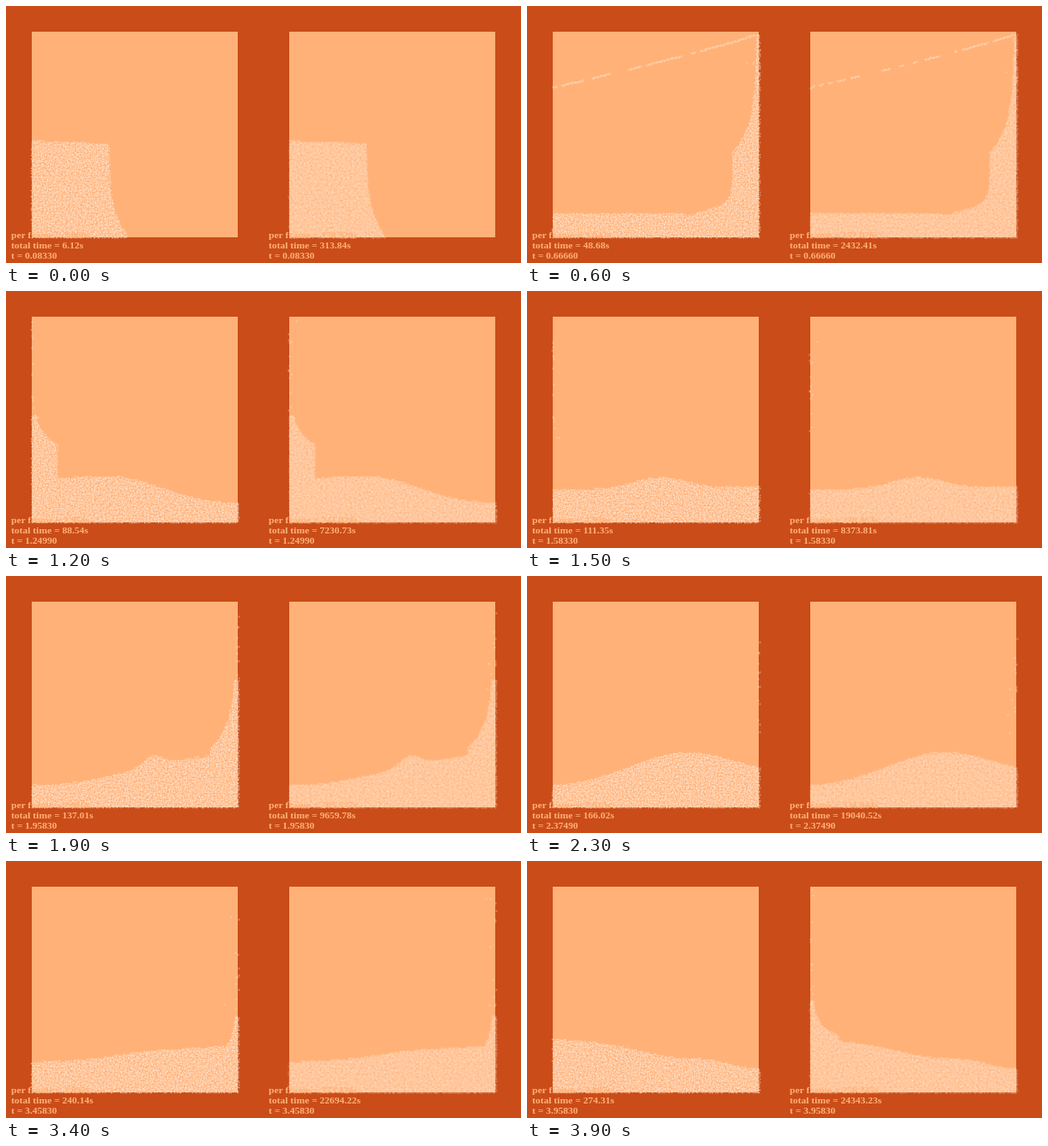
A matplotlib script for the animation above (4 s loop, 600 by 300 pixels).

```python
import math

import matplotlib.pyplot as plt
import numpy as np
from matplotlib.animation import FuncAnimation
from matplotlib.patches import Rectangle

W, H, DPI = 600, 300, 100
FRAMES, INTERVAL = 40, 100
FPS = 24  # simulated steps per second
BACK, BOX, FOAM = "#ca4c18", "#ffb178", "#fff3e6"
LO, SIZE = 30, 240  # tank corner and side
HI = LO + SIZE
PANELS = (0, 300)
CELL = 1.7  # particle spacing

# Sloshing pool: step, depth left, depth right, crest x, crest height, crest width
POOL = np.array([
    (4, 0, 0, 200, 0, 40),
    (16, 29, 27, 205, 0, 40),
    (22, 30, 46, 160, 24, 45),
    (30, 50, 23, 110, 14, 65),
    (47, 26, 62, 140, 12, 16),
    (57, 24, 36, 148, 32, 88),
    (71, 58, 30, 85, 14, 35),
    (83, 36, 54, 130, 2, 35),
    (95, 62, 27, 185, 7, 35),
])

# Water climbing a wall: wall, first step, last step, foot, thickness, decay, top, panels
RUNUPS = (
    ("right", 5, 22, 100, 28, 30, 237, (0, 1)),
    ("left", 25, 37, 92, 26, 14, 126, (0, 1)),
    ("right", 40, 56, 70, 29, 27, 150, (0, 1)),
    ("left", 65, 77, 60, 3, 10, 75, (0, 1)),
    ("right", 78, 90, 55, 10, 15, 90, (0, 1)),
    ("left", 90, 102, 67, 30, 11, 108, (1,)),
)

STEPS = (2, 16, 30, 47, 57, 71, 95)
TOTALS = ((6.12, 48.68, 88.54, 137.01, 166.02, 205.97, 274.31),
          (313.84, 2432.41, 7230.73, 9659.78, 19040.52, 21045.21, 24343.23))


def lattice():
    """Staggered particle sites as x from the left wall and height."""
    x, h = np.meshgrid(np.arange(0, SIZE + 1, CELL), np.arange(0.4, SIZE, CELL))
    x[1::2] += CELL / 2
    return x.ravel(), h.ravel()


SITE_X, SITE_H = lattice()


def pool(x, step):
    left, right, cx, height, width = (
        np.interp(step, POOL[:, 0], col) for col in POOL[:, 1:].T)
    tilt = (left - right) / 2 * np.cos(math.pi * x / SIZE)
    return (left + right) / 2 + tilt + height * np.exp(-((x - cx) / width) ** 2)


def block(x, step):
    """Collapsing column with a front that spreads along the floor."""
    top = np.interp(step, (2, 6, 11, 16, 17), (113, 70, 40, 29, 0))
    edge = np.interp(step, (2, 6), (90, 65))
    reach = np.interp(step, (2, 6, 10), (22, 175, 400))
    power = np.interp(step, (2, 6), (3.5, 1.5))
    front = np.clip((x - edge) / reach, 0, 1) ** (1 / power)
    return (top - x / 30) * (1 - front)


def envelope(step, first, last):
    if not first < step < last:
        return 0
    return min(1, 1.6 * math.sin(math.pi * (step - first) / (last - first)))


def runup(x, h, step, wall, first, last, foot, thick, decay, top):
    """True where a sheet of water clings to the wall."""
    e = envelope(step, first, last)
    gap = SIZE - x if wall == "right" else x
    sheet = thick * np.exp(-np.maximum(h - foot * e, 0) / decay)
    corner = 1.6 * thick * np.exp(-np.maximum(h - 29, 0) / 8)
    if wall == "left":
        corner = 0
    return (gap < e * (sheet + corner) + 3) & (h < top * e)


def water(panel, step):
    x, h = SITE_X, SITE_H
    wet = h < np.maximum(pool(x, step), block(x, step))
    for *shape, panels in RUNUPS:
        if panel in panels:
            wet |= runup(x, h, step, *shape)
    rng = np.random.default_rng(100 * step + panel)
    spread = (0.85, 0.6)[panel]
    sites = np.column_stack((LO + x[wet], HI - h[wet]))
    sites += rng.uniform(-spread, spread, sites.shape)
    return np.clip(sites, LO - 0.7, HI + 0.7)


def jet(panel, step):
    """Thin sheet thrown back from the top right corner."""
    if not 10 < step < 22:
        return np.empty((0, 2))
    tip = max(LO, 266 - 236 * (step - 10) / 5.5)
    x = np.arange(tip, 266, 1.3)
    late = max(0, step - 16)
    drop = 62 * ((266 - x) / 236) ** 0.9 * min(1, (step - 8) / 8)
    rng = np.random.default_rng(7 * step + panel)
    y = 33 + drop + 4 * late + 1.7 * late ** 2
    y += rng.normal(0, 0.4 + 0.8 * late, len(x))
    gaps = np.repeat(rng.random(len(x) // 4 + 1), 4)[:len(x)]
    return np.column_stack((x, y))[gaps < 0.4 + 0.5 * (x - LO) / SIZE - 0.09 * late]


def drops(panel, step):
    """The jet, and loose drops on the walls above each run-up."""
    groups = [jet(panel, step)]
    for i, (wall, first, last, *_, top, panels) in enumerate(RUNUPS):
        if panel in panels and first + 3 < step < last + 3:
            rng = np.random.default_rng(10 * i + panel)
            off = rng.exponential(2.5, 14) - 1
            x = HI - off if wall == "right" else LO + off
            y = HI - rng.uniform(0.8 * top, 235, 14) + 3 * (step - first - 6)
            groups.append(np.column_stack((x, np.maximum(y, LO))))
    return np.vstack(groups)


def labels(panel, step):
    total = np.interp(step, STEPS, TOTALS[panel])
    clock = math.floor(step / FPS * 1e4 - 1e-3) / 1e4
    return (f"per frame = {total / step:.3f}s",
            f"total time = {total:.2f}s",
            f"t = {clock:.5f}")


def dots(diameter, alpha, z):
    size = (diameter * 72 / DPI) ** 2
    return ax.scatter([], [], s=size, c=FOAM, alpha=alpha, linewidths=0, zorder=z)


fig = plt.figure(figsize=(W / DPI, H / DPI), dpi=DPI, facecolor=BACK)
ax = fig.add_axes([0, 0, 1, 1])
ax.set(xlim=(0, W), ylim=(H, 0), autoscale_on=False)
ax.axis("off")

bodies, sprays, texts = [], [], []
for panel, left in enumerate(PANELS):
    ax.add_patch(Rectangle((left + LO, LO), SIZE, SIZE, fc=BOX, lw=0))
    bodies.append(dots((1.8, 2.5)[panel], (0.46, 0.24)[panel], 2))
    sprays.append(dots(2.4, 0.3, 3))
    texts.append([ax.text(left + 5.5, y, "", color=BOX, family="Liberation Serif",
                          weight="bold", size=11.5 * 72 / DPI, va="baseline",
                          zorder=4) for y in (271, 283, 295)])


def draw(frame):
    step = 2 + frame * 12 // 5
    for panel, left in enumerate(PANELS):
        bodies[panel].set_offsets(water(panel, step) + (left, 0))
        sprays[panel].set_offsets(drops(panel, step) + (left, 0))
        for item, label in zip(texts[panel], labels(panel, step)):
            item.set_text(label)
    return bodies + sprays + texts[0] + texts[1]


anim = FuncAnimation(fig, draw, frames=FRAMES, interval=INTERVAL,
                     init_func=lambda: draw(0), repeat=True, repeat_delay=0)
plt.show()
```
